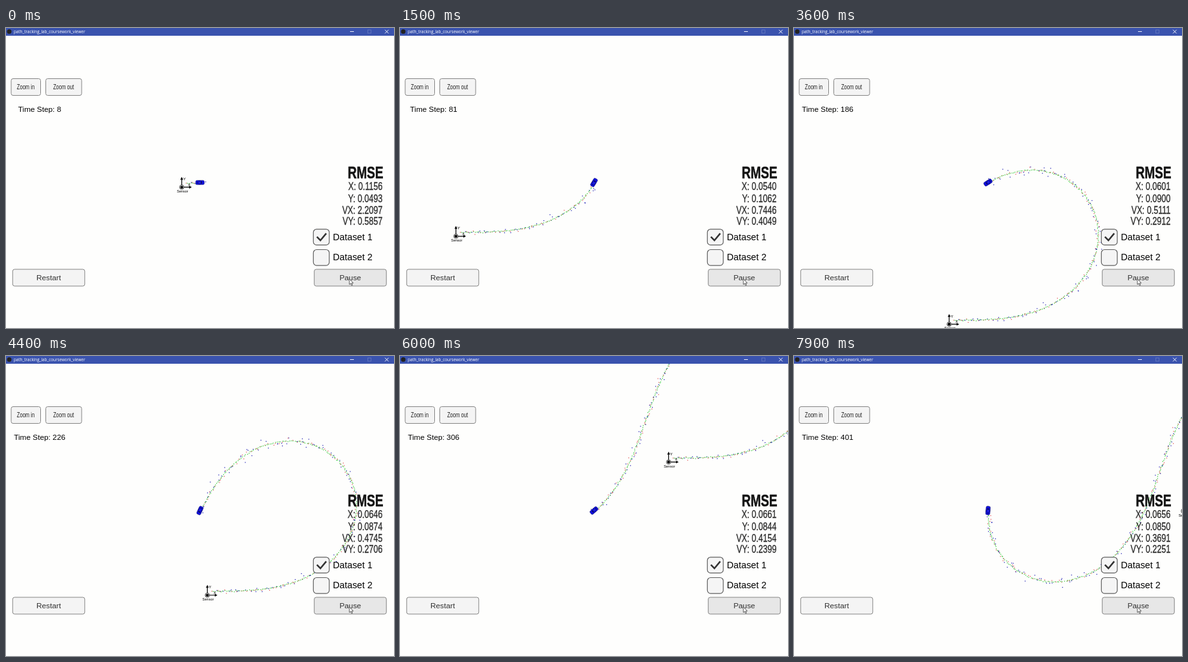
An HTML page with a canvas for the animation above (8 s loop, 600x465 px).

```html
<!DOCTYPE html>
<html lang="en">
<head>
<meta charset="utf-8">
<title>Tracking viewer</title>
<style>
  html, body { margin: 0; width: 100%; height: 100%; overflow: hidden; background: #fefefd; }
  canvas, svg { position: absolute; left: 0; top: 0; width: 600px; height: 465px; }
  text { font-family: "Liberation Sans", Arial, sans-serif; }
  .button { fill: #f4f4f4; stroke: #858585; }
  .pressed { fill: #e7e7e7; }
  .box { fill: #f5f5f5; stroke: #606060; stroke-width: 1.2; }
  .caption { font-size: 11.8px; fill: #323232; text-anchor: middle; }
  .option { font-size: 14.3px; }
  .window { font: 6.3px "Open Sans", "Noto Sans", sans-serif; fill: #fff; }
  .line { fill: none; stroke: #fff; stroke-width: .9; }
</style>
</head>
<body>
<canvas id="trail" width="600" height="465"></canvas>
<svg viewBox="0 0 600 465">
  <g id="sensor">
    <path d="M0 0V-12M0 0H12" stroke="#000" stroke-width="1.2"/>
    <path d="M-2.2 -11.5L0 -16L2.2 -11.5ZM11.5 -2.2L15.5 0L11.5 2.2Z"/>
    <circle r="3.4" fill="#fff" stroke="#000" stroke-width=".7"/>
    <circle r="2.3"/>
    <g font-size="6">
      <text x="2.2" y="-10.5">Y</text>
      <text x="9.5" y="-2">X</text>
      <text x="-7.5" y="8.3" font-size="5.5">Sensor</text>
    </g>
  </g>

  <g id="car">
    <rect x="-6.7" y="-3.3" width="13.4" height="6.6" rx="2.2" fill="#1010dc" stroke="#08086a" stroke-width=".5"/>
    <path d="M2.6 -2.2Q3.8 0 2.6 2.2L1.6 1.7V-1.7ZM-4.4 -2L-3.6 -1.6V1.6L-4.4 2Z" fill="#0a0a48"/>
    <path d="M-2.4 -2.7H1M-2.4 2.7H1" stroke="#0a0a50" stroke-width=".6"/>
    <circle cx="-.6" cy=".3" r=".6" fill="#6a6aa8"/>
  </g>

  <rect width="600" height="12" fill="#3a53ae"/>
  <circle cx="5" cy="5.5" r="3.5" fill="#222"/>
  <text class="window" x="12" y="7.7">path_tracking_lab_coursework_viewer</text>
  <path class="line" d="M532 5.5H538M586 2.8L591.6 8.4M591.6 2.8L586 8.4"/>
  <rect class="line" x="559.5" y="3" width="5" height="5" opacity=".2"/>

  <rect class="button" x="8" y="78.5" width="45.5" height="26" rx="3"/>
  <rect class="button" x="61.5" y="78.5" width="55.5" height="26" rx="3"/>
  <g font-size="11" fill="#222" text-anchor="middle">
    <text transform="translate(30.5 95.4) scale(.69 1)">Zoom in</text>
    <text transform="translate(89 95.4) scale(.69 1)">Zoom out</text>
  </g>
  <text id="step" x="52" y="130.3" font-size="11.8" text-anchor="middle"></text>

  <rect class="button" x="10.3" y="374" width="111.5" height="26" rx="3"/>
  <text class="caption" x="66" y="391">Restart</text>
  <rect class="button pressed" x="476.7" y="374" width="111.5" height="26" rx="3"/>
  <text class="caption" x="532.4" y="391">Pause</text>

  <rect class="box" x="475.3" y="311.8" width="24.6" height="24.6" rx="5"/>
  <rect class="box" x="475.3" y="343.5" width="24.6" height="24.6" rx="5"/>
  <path d="M480.8 323.6L486.2 329.2L495.2 318.4" fill="none" stroke="#333" stroke-width="2.5"/>
  <text class="option" x="505.5" y="328.6">Dataset 1</text>
  <text class="option" x="505.5" y="360.1">Dataset 2</text>

  <text transform="translate(583.6 233) scale(.75 1)" font-size="25.5" font-weight="bold" fill="#141414" stroke="#141414" stroke-width=".5" text-anchor="end">RMSE</text>
  <g id="errors" transform="translate(582.4 0) scale(.79 1)" font-size="16" fill="#282828" stroke="#282828" stroke-width=".3" text-anchor="end">
    <text y="251.2"></text>
    <text y="269.7"></text>
    <text y="288.3"></text>
    <text y="305"></text>
  </g>

  <path d="M531 388.8V397.6L533 395.8L534.4 399L535.8 398.4L534.4 395.3H537Z" fill="#fff" stroke="#222" stroke-width=".7"/>
</svg>

<script>
const LOOP = 8000, TICK = 100, LAST = 401;
const SCALE = 11.33;                 // pixels per metre
const CAR = { x: 300, y: 239.5 };
const ORIGIN = { x: 301.4, y: 240.5 }; // trail anchor under the car
const SENSOR = { x: .7, y: -.7 };      // icon offset from the trail's zero point

// Error readings at a few steps: step, X, Y, VX, VY
const READINGS = [
  [8, .1156, .0493, 2.2097, .5857],
  [81, .0540, .1062, .7446, .4049],
  [146, .0523, .0938, .5630, .3206],
  [226, .0646, .0874, .4745, .2706],
  [266, .0633, .0829, .4412, .2520],
  [346, .0682, .0856, .3945, .2301],
  [401, .0656, .0850, .3691, .2251]
];
const LABELS = ["X", "Y", "VX", "VY"];

const $ = id => document.getElementById(id);
const ctx = $("trail").getContext("2d");
const errorTexts = $("errors").children;

let seed = 20177;
const random = () => (seed = (seed * 16807) % 2147483647) / 2147483647;
const gauss = () => Math.sqrt(-2 * Math.log(random())) * Math.cos(2 * Math.PI * random());

// Speed and turn rate both swing over a period of 500 steps
const phase = k => 2 * Math.PI * k / 500;
const yaw = k => .55 * 25 / (2 * Math.PI) * (1 - Math.cos(phase(k)));
const speed = k => 5 + .2 * Math.cos(2 * phase(k));

const path = [{ x: .6, y: .6 }];
for (let k = 0; k < LAST; k++) {
  const d = speed(k + .5) * .05, a = yaw(k + .5), p = path[k];
  path.push({ x: p.x + d * Math.cos(a), y: p.y + d * Math.sin(a) });
}

// Each step leaves an estimate and a laser or radar measurement
const marks = path.map((p, k) => {
  const est = { x: p.x + gauss() * .04, y: p.y + gauss() * .04 };
  if (k % 2) return { est, hit: { x: p.x + gauss() * .15, y: p.y + gauss() * .15 }, color: "#e25858" };
  const r = Math.hypot(p.x, p.y) + gauss() * .27;
  const a = Math.atan2(p.y, p.x) + gauss() * .022;
  return { est, hit: { x: r * Math.cos(a), y: r * Math.sin(a) }, color: "#2424b4" };
});

// Interpolates the summed squared error, as a running RMSE grows
function rmse(step, col) {
  let i = 1;
  while (READINGS[i][0] < step) i++;
  const a = READINGS[i - 1], b = READINGS[i];
  const sum = row => row[0] * row[col] ** 2;
  const f = (step - a[0]) / (b[0] - a[0]);
  return Math.sqrt((sum(a) + (sum(b) - sum(a)) * f) / step);
}

function draw(step) {
  const at = path[step];
  const sx = ORIGIN.x - at.x * SCALE, sy = ORIGIN.y + at.y * SCALE;
  const dot = (p, size, color) => {
    ctx.fillStyle = color;
    ctx.fillRect(sx + p.x * SCALE - size / 2, sy - p.y * SCALE - size / 2, size, size);
  };
  ctx.clearRect(0, 0, 600, 465);
  for (let k = 1; k <= step; k++) {
    const m = marks[k];
    dot(m.hit, 1.25, m.color);
    dot(m.est, 1.3, "#48cc48");
  }
  $("sensor").setAttribute("transform", `translate(${sx + SENSOR.x} ${sy + SENSOR.y})`);
  $("car").setAttribute("transform",
    `translate(${CAR.x} ${CAR.y}) rotate(${-yaw(step) * 180 / Math.PI})`);
  $("step").textContent = "Time Step: " + step;
  LABELS.forEach((name, i) => {
    errorTexts[i].textContent = `${name}: ${rmse(step, i + 1).toFixed(4)}`;
  });
}

let shown = -1;
function frame() {
  const n = Math.floor(performance.now() % LOOP / TICK);
  const step = Math.max(8, 6 + 5 * n);
  if (step !== shown) draw(shown = step);
  requestAnimationFrame(frame);
}
frame();
</script>
</body>
</html>
```
